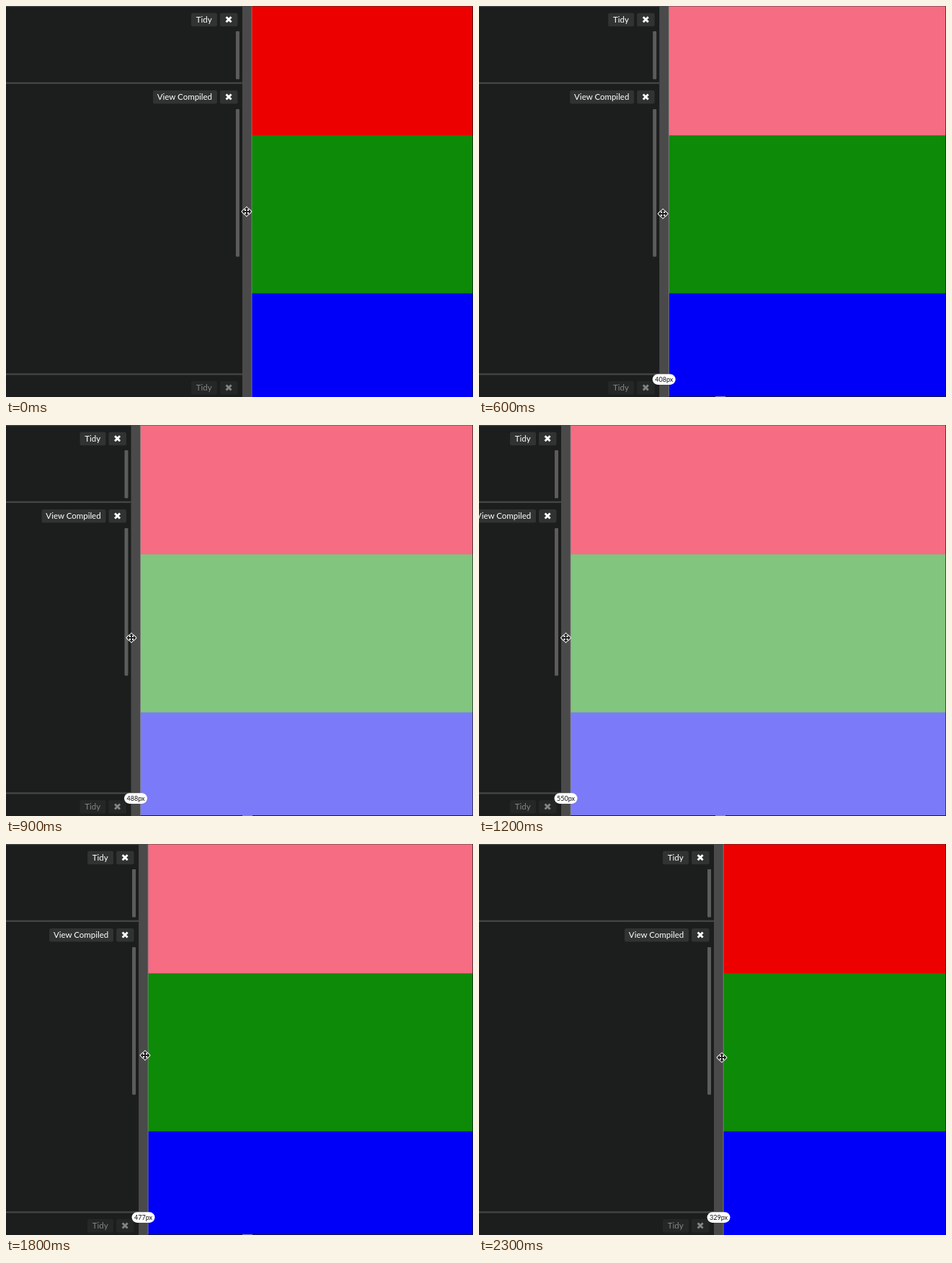
An HTML page for the animation above (2400 ms loop, 648x542 px).

```html
<!DOCTYPE html>
<html lang="en">
<head>
<meta charset="utf-8">
<title>Resizable pane</title>
<style>
html, body { margin: 0; width: 100%; height: 100%; overflow: hidden; background: #1c1d1d; }
svg { display: block; width: 648px; height: 542px; }
text { font-family: Lato, sans-serif; font-size: 11.5px; fill: #fff; text-anchor: middle; }
.btn { fill: #313232; }
.rule { fill: #464646; }
.thumb { fill: #5c5c5c; }
.cross { stroke: #fff; stroke-width: 2.9; }
.dim { opacity: .45; }
#size text { font-size: 9px; fill: #111; }
</style>
</head>
<body>
<svg viewBox="0 0 648 542">
  <defs>
    <g id="close">
      <rect class="btn" x="-31" y="-9" width="24.5" height="18.5" rx="2.5"/>
      <path class="cross" d="M-22.4 -3.5l7 7m0 -7l-7 7"/>
    </g>
    <g id="tidy">
      <rect class="btn" x="-71" y="-9" width="36" height="18.5" rx="2.5"/>
      <text x="-53.3" y="4">Tidy</text>
      <use href="#close"/>
    </g>
    <path id="arrows" d="M-6.5 0L-3 -3.5V-1H-1V-3H-2.8L0 -6.2L2.8 -3H1V-1H3V-3.5L6.5 0L3 3.5V1H1V3H2.8L0 6.2L-2.8 3H-1V1H-3V3.5Z"/>
  </defs>

  <g id="split">
    <rect x="-400" width="400" height="542" fill="#1c1d1d"/>
    <rect class="rule" x="-400" width="400" height="1.2"/>
    <rect class="rule" x="-400" y="105.7" width="400" height="2.2"/>
    <rect class="rule" x="-400" y="509.3" width="400" height="2.2"/>

    <use href="#tidy" y="18.7"/>
    <g transform="translate(0 126)">
      <rect class="btn" x="-124" y="-9" width="89" height="18.5" rx="2.5"/>
      <text x="-80" y="4">View Compiled</text>
      <use href="#close"/>
    </g>
    <use href="#tidy" y="529" class="dim"/>

    <rect class="thumb" x="-9" y="35" width="5" height="66.5" rx="1"/>
    <rect class="thumb" x="-9" y="143" width="5" height="204.5" rx="1"/>

    <rect id="top" x="13" y="0" width="640" height="180"/>
    <rect id="mid" x="13" y="179.3" width="640" height="220"/>
    <rect id="low" x="13" y="398.4" width="640" height="144"/>
    <rect width="13" height="542" fill="#4a4a4a"/>
    <rect x="12.7" width=".8" height="542" fill="#858585"/>
    <rect x="13.3" width="640" height="1" fill="#333" opacity=".45"/>
  </g>

  <rect x="647" width="1" height="542" fill="#111" opacity=".65"/>
  <g id="edge">
    <rect id="floor" y="541" width="648" height="1" fill="#181840"/>
    <rect x="328" y="541" width="14" height="1" fill="#8a8aa0"/>
  </g>

  <g id="size">
    <rect x="-16" y="510.3" width="32" height="14.6" rx="7.3" fill="#fff"/>
    <text id="label" y="520.9"></text>
  </g>
  <g id="cursor">
    <use href="#arrows" fill="#fff" stroke="#fff" stroke-width="1.8" stroke-linejoin="round"/>
    <use href="#arrows" fill="#222"/>
  </g>
</svg>
<script>
const STEP = 100;
// Pane width in px at each step
const widths = [327, 327, 331, 344, 363, 385, 408, 430, 458, 488, 514, 535,
  550, 550, 543, 528, 512, 495, 477, 462, 432, 398, 361, 329];
// Pointer: step, offset from the divider, height
const pointer = [[0, 6, 285], [2, 6, 285], [6, 5, 288], [9, .5, 295], [12, 6.5, 295],
  [13, 6.5, 295], [16, 10, 295], [18, 9, 293], [23, 11, 296]];

const el = id => document.getElementById(id);
const move = (id, x, y = 0) => el(id).setAttribute("transform", `translate(${x} ${y})`);
const fill = (id, color) => el(id).setAttribute("fill", color);
const show = (id, on) => el(id).setAttribute("visibility", on ? "visible" : "hidden");

function pointerAt(step) {
  const i = Math.max(1, pointer.findIndex(p => p[0] >= step));
  const a = pointer[i - 1], b = pointer[i];
  const k = (step - a[0]) / (b[0] - a[0]);
  return [a[1] + (b[1] - a[1]) * k, a[2] + (b[2] - a[2]) * k];
}

function draw(step) {
  const px = widths[step];
  const x = 326 - (px - 329) / 1.0425;
  const [dx, y] = pointerAt(step);
  const medium = px >= 400, wide = px >= 480;
  move("split", x);
  move("size", x + 6.5);
  move("cursor", x + dx, y);
  el("floor").setAttribute("x", x + 13);
  el("label").textContent = px + "px";
  fill("top", medium ? "#f66c82" : "#ec0000");
  fill("mid", wide ? "#81c57e" : "#0d8a08");
  fill("low", wide ? "#7b7bf9" : "#0000f8");
  show("size", step > 1);
  show("edge", medium);
}

const start = performance.now();
function tick() {
  draw(Math.floor((performance.now() - start) / STEP) % widths.length);
  requestAnimationFrame(tick);
}
tick();
</script>
</body>
</html>
```
